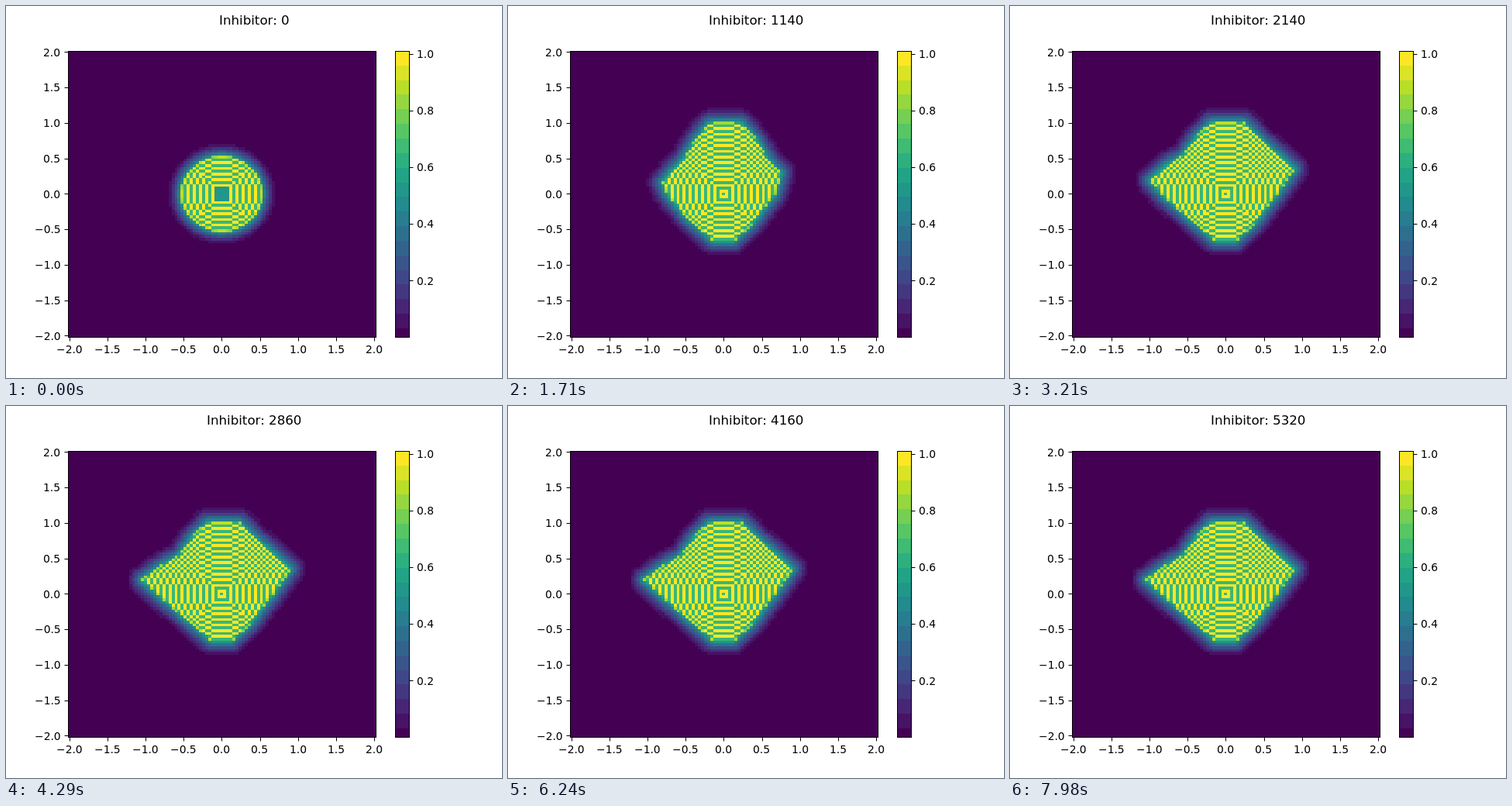
An HTML page with a canvas that plays this animation: 640 by 480 pixels, repeating every 8 s.

```html
<!DOCTYPE html>
<html lang="en">
<head>
<meta charset="utf-8">
<title>Inhibitor</title>
<style>
  html, body { margin: 0; width: 100%; height: 100%; overflow: hidden; background: #fff; }
  canvas { display: block; }
</style>
</head>
<body>
<canvas id="stage" width="640" height="480"></canvas>
<script>
const ctx = document.getElementById('stage').getContext('2d');
const LOOP = 8000, STEP = 30, CELLS = 101, MID = 50, LEVELS = 21;
const plot = { x: 80, y: 57.6, w: 396.8, h: 369.6 };
const cellW = plot.w / CELLS, cellH = plot.h / CELLS;

const viridis = ['440154', '482475', '414487', '355f8d', '2a788e', '21918c',
  '22a884', '44bf70', '7ad151', 'bddf26', 'fde725']
  .map(hex => [0, 2, 4].map(k => parseInt(hex.slice(k, k + 2), 16)));

function color(value) {
  const p = value * 10, k = Math.min(9, Math.floor(p));
  return `rgb(${viridis[k].map((c, n) => Math.round(c + (viridis[k + 1][n] - c) * (p - k)))})`;
}
const palette = Array.from({ length: LEVELS + 1 }, (_, k) => color(k / LEVELS));

// The blob starts as a disc; each corner grows outward to x, y (in cells) by its own time.
const DISC = 13.4;
const corners = [
  { x: 16.3, y: 0, end: 900 }, { x: 22, y: 8.8, end: 3300 },
  { x: 17, y: 13.5, end: 3300 }, { x: 11, y: 19.2, end: 2100 },
  { x: 5.5, y: 24.8, end: 1800 }, { x: -4.5, y: 24.8, end: 1800 },
  { x: -9, y: 20, end: 2100 }, { x: -13.5, y: 13.3, end: 2600 },
  { x: -19, y: 10, end: 3300 }, { x: -25.5, y: 5, end: 3900 },
  { x: -20, y: -0.5, end: 3000 }, { x: -11, y: -8.9, end: 900 },
  { x: -3.3, y: -16.2, end: 900 }, { x: 3, y: -16.2, end: 900 },
  { x: 9, y: -10, end: 900 }
];

function outlineAt(time) {
  return corners.map(({ x, y, end }) => {
    const grown = 1 - (1 - Math.min(1, time / end)) ** 1.3;
    const start = DISC / Math.hypot(x, y);
    const scale = start + (1 - start) * grown;
    return [x * scale, y * scale];
  });
}

// Signed distance from the polygon, negative inside.
function polygonDistance(x, y, points) {
  let best = Infinity, inside = false;
  points.forEach(([ax, ay], k) => {
    const [bx, by] = points[(k + 1) % points.length];
    const dx = bx - ax, dy = by - ay;
    const u = Math.max(0, Math.min(1, ((x - ax) * dx + (y - ay) * dy) / (dx * dx + dy * dy)));
    best = Math.min(best, Math.hypot(x - ax - u * dx, y - ay - u * dy));
    if ((ay > y) !== (by > y) && x < ax + (y - ay) * dx / dy) inside = !inside;
  });
  return inside ? -best : best;
}

// Stripes run parallel to the nearer axis and shift where the disc's edge steps by a cell.
function ringAt(x, y) {
  const near = Math.min(Math.abs(x), Math.abs(y));
  const far = Math.max(Math.abs(x), Math.abs(y));
  const shift = near < 8 ? 13 - Math.floor(Math.sqrt(DISC * DISC - near * near)) : near - 5;
  return far + (far > 3 ? shift : 0);
}

function concentration(x, y, points, time) {
  const growth = Math.min(1, time / 900);
  const d = Math.min(Math.hypot(x, y) - DISC, polygonDistance(x, y, points) - 0.7 * growth);
  if (d > 0) {
    const spread = 4.8 + 0.8 * growth;
    return d < spread ? 0.52 * (1 - d / spread) ** 1.6 : 0;
  }
  const ring = ringAt(x, y), edge = Math.min(1, -d);
  const stripe = ring % 2 ? 0.82 + 0.18 * edge : 0.52 + 0.16 * edge;
  const settled = ring < 3 ? Math.min(1, time / 600) : 1;
  return 0.54 + (stripe - 0.54) * settled;
}

function drawField(time) {
  ctx.fillStyle = palette[0];
  ctx.fillRect(80, 58, 397, 369);
  const points = outlineAt(time);
  for (let y = -24; y <= 33; y++) {
    for (let x = -34; x <= 31; x++) {
      const level = Math.round(concentration(x, y, points, time) * LEVELS);
      if (!level) continue;
      const left = Math.round(plot.x + (x + MID) * cellW);
      const top = Math.round(plot.y + (MID - y) * cellH);
      ctx.fillStyle = palette[level];
      ctx.fillRect(left, top,
        Math.round(plot.x + (x + MID + 1) * cellW) - left,
        Math.round(plot.y + (MID - y + 1) * cellH) - top);
    }
  }
}

function drawColorbar() {
  const bands = 20, top = 58, bottom = 427;
  const edge = k => k === 0 ? bottom : Math.round(416 - (k - 1) * 18.85);
  for (let k = 0; k < bands; k++) {
    const upper = Math.max(top, edge(k + 1));
    ctx.fillStyle = color(k / (bands - 1));
    ctx.fillRect(502, upper, 18, edge(k) - upper);
  }
}

// Text starts on a whole pixel; anchor is 0 for left, 0.5 for centre, 1 for right.
function label(text, x, y, anchor, size = 13.89) {
  ctx.fillStyle = '#000';
  ctx.font = `${size}px "DejaVu Sans", sans-serif`;
  ctx.fillText(text, Math.round(x - ctx.measureText(text).width * anchor), Math.round(y));
}

function drawAxes() {
  ctx.fillStyle = ctx.strokeStyle = '#000';
  ctx.lineWidth = 1;
  ctx.strokeRect(80.5, 58.5, 397, 369);
  ctx.strokeRect(502.5, 58.5, 18, 369);
  for (let v = -2; v <= 2; v += 0.5) {
    const text = (v < 0 ? '\u2212' : '') + Math.abs(v).toFixed(1);
    const x = plot.x + (v * 25 + MID + 0.5) * cellW;
    const y = plot.y + (MID + 0.5 - v * 25) * cellH;
    ctx.fillRect(Math.round(x), 427.5, 1, 5);
    ctx.fillRect(75.5, Math.round(y), 5, 1);
    label(text, x, 448, 0.5);
    label(text, 70.3, y + 5.2, 1);
  }
  for (let k = 1; k <= 5; k++) {
    const y = 427.6 - k * 73.2;
    ctx.fillRect(520.5, Math.round(y), 5, 1);
    label((k / 5).toFixed(1), 530, y + 5.2, 0);
  }
}

let shown = -1;
function frame() {
  const step = Math.floor(performance.now() % LOOP / STEP);
  if (step !== shown) {
    shown = step;
    ctx.fillStyle = '#fff';
    ctx.fillRect(0, 0, 640, 480);
    drawField(step * STEP);
    drawColorbar();
    drawAxes();
    label(`Inhibitor: ${step * 20}`, 320, 24, 0.5, 16.67);
  }
  requestAnimationFrame(frame);
}
frame();
</script>
</body>
</html>
```
